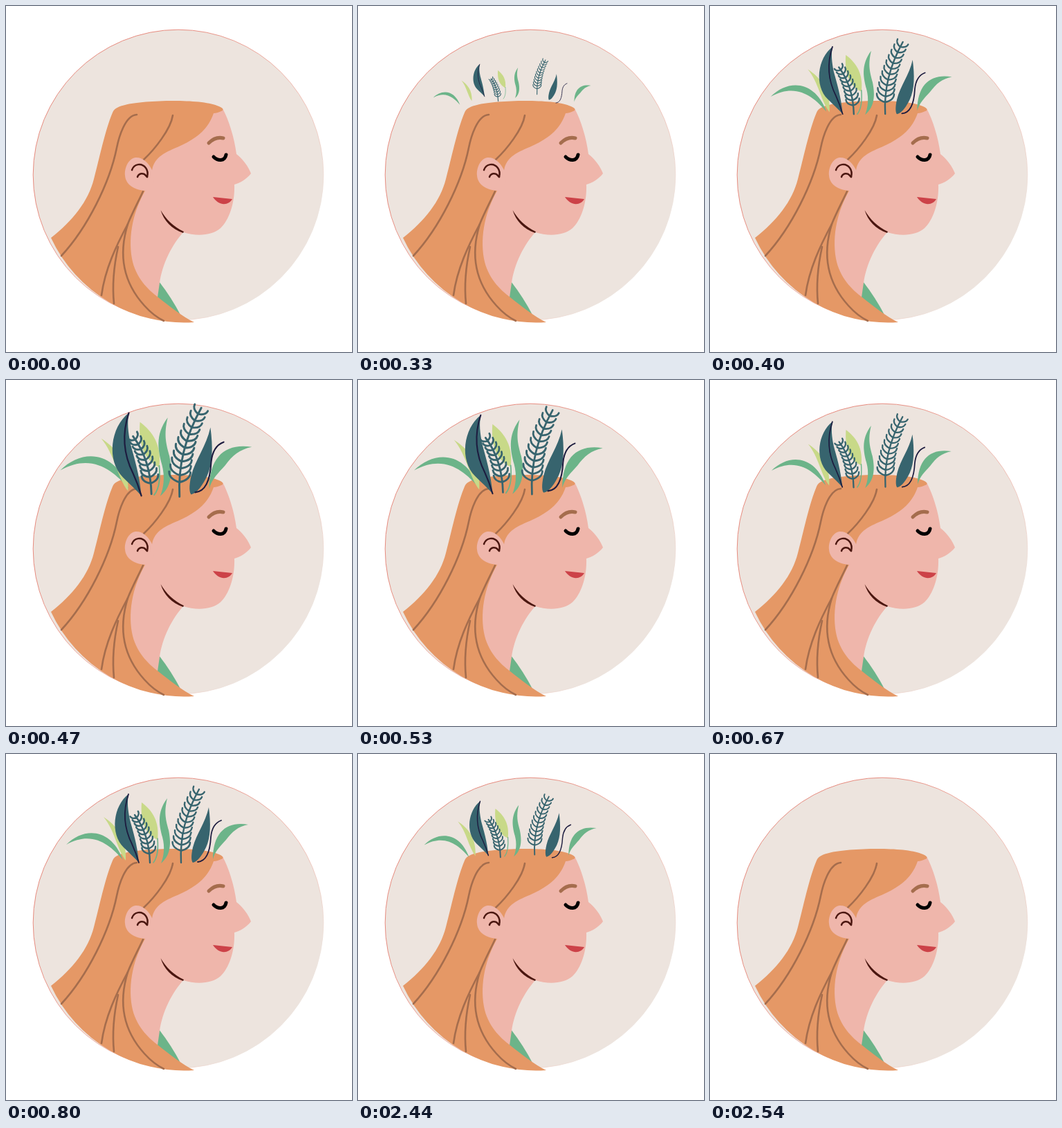
Write an HTML page that moves like this. It is 500 px wide and 500 px high and loops after 3500 ms.

```html
<!DOCTYPE html>
<html lang="en">
<head>
<meta charset="utf-8">
<title>Blooming mind</title>
<style>
html, body { margin: 0; width: 100%; height: 100%; overflow: hidden; background: #fff; }
svg { display: block; width: 100vw; height: 100vh; }
.line { fill: none; stroke-linecap: round; stroke-linejoin: round; }
.green { fill: #6cb489; }
.lime { fill: #c8d988; }
.teal { fill: #37646e; }
.navy { stroke: #1d1c3f; stroke-width: 1.8; }
.fern { stroke: #37646e; stroke-width: 2.4; }
.skin { fill: #efb6ab; }
.strand { stroke: #a56d4d; stroke-width: 2.6; }
</style>
</head>
<body>
<svg viewBox="0 0 500 500">
  <defs>
    <linearGradient id="rim" x2="1" y2=".8">
      <stop offset=".3" stop-color="#e58073"/>
      <stop offset=".65" stop-color="#f0b5aa"/>
      <stop offset=".9" stop-color="#ede4de"/>
    </linearGradient>
  </defs>
  <circle cx="249" cy="244" r="209.8" fill="#ede4de" stroke="url(#rim)" stroke-width=".9"/>

  <!-- face, neck and collar -->
  <path class="green" d="M221 398Q239 421 253 448L215 424Z"/>
  <path class="skin" d="M313 148C322 165 330 190 333 214C343 222 350 232 354 242C348 250 338 256 330 258C331 285 322 310 310 321C298 332 275 333 256 327C240 345 226 372 222 400L219 421L176 395V200L290 146Z"/>
  <path fill="#e59866" d="M65 335C96 311 119 282 127 250C135 220 143 180 154 154C157 147 164 145 172 143C200 136 280 134 305 144C315 147 315 151 311 152C307 154 303 155 300 155C293 176 278 190 252 202C232 211 214 217 211 238L201 267C185 295 176 330 182 365C187 392 205 410 220 421C235 433 255 449 272 457A212 212 0 0 1 65 335Z"/>
  <g class="line strand">
    <path d="M189 157C172 158 163 190 160 205C150 255 118 320 80 361"/>
    <path d="M241 158C238 178 215 207 199 222"/>
    <path d="M198 268C190 285 182 300 176 315C160 345 143 380 138 418"/>
    <path d="M162 348C156 375 153 400 156 430"/>
    <path d="M176 315C162 360 170 400 200 433C208 442 218 450 228 455"/>
  </g>
  <path class="skin" d="M212 239C206 225 196 218 187 219C176 221 171 235 172 245C173 258 185 266 202 267L214 255Z"/>
  <g class="line" stroke="#4b1710" stroke-width="2.5">
    <path d="M182 237C185 228 196 226 202 234C205 238 205 243 204 247"/>
    <path d="M190 247C192 241 199 241 202 245L204 247"/>
  </g>
  <path fill="#4b1710" d="M223.5 295C231 308 242 319 257 326L256 328C239 322 228 310 223.500 295Z"/>
  <path class="line" stroke="#a56d4d" stroke-width="5" d="M293 198C299 192 306 189 314 191"/>
  <path class="line" stroke="#000" stroke-width="5" d="M300 218C306 224 316 225 318 215"/>
  <path fill="#cc4248" d="M299 276L327 279C322 288 308 290 299 276Z"/>

  <g id="plants">
    <path class="green" d="M87 131C113 105 152 107 169 153C150 131 125 110 87 131Z"/>
    <path class="lime" d="M141 91C158 102 175 120 173 154C160 137 157 110 141 91Z"/>
    <g>
      <path class="teal" d="M177 58C155 75 150 115 170 135C178 143 186 150 192 157C190 132 183 110 179 95C176 80 175 70 177 58Z"/>
      <path class="line navy" d="M177 58C168 85 172 110 182 130Q188 143 192 157"/>
    </g>
    <g>
      <path class="lime" d="M196 70C212 82 222 98 219 124C200 115 194 95 196 70Z"/>
      <path class="line" stroke="#6cb489" stroke-width="1.5" d="M219 122C220 135 220 148 213 157"/>
    </g>
    <path class="line fern" id="small"/>
    <path class="green" d="M233 64C217 85 222 105 226 120C230 135 228 148 224 158C240 145 238 125 235 110C231 95 228 85 233 64Z"/>
    <path class="line fern" id="tall"/>
    <path class="teal" d="M293 77C288 100 275 115 270 135C267 148 268 155 270 157C278 155 284 145 289 135C296 120 296 100 293 77Z"/>
    <path class="line navy" d="M311 96C300 100 297 110 296 120C295 140 290 155 277 156"/>
    <path class="green" d="M350 102C320 97 299 112 299 152C302 140 310 133 318 124C327 112 335 105 350 102Z"/>
  </g>
</svg>
<script>
const LOOP = 3500;

// Quadratic stem with pairs of curled leaflets, shorter towards the tip.
function fern(id, [x0, y0], [cx, cy], [x1, y1], pairs, size) {
  let d = `M${x0} ${y0}Q${cx} ${cy} ${x1} ${y1}`;
  const at = (a, b, c, t) => (1 - t) ** 2 * a + 2 * t * (1 - t) * b + t * t * c;
  const slope = (a, b, c, t) => (1 - t) * (b - a) + t * (c - b);
  for (let i = 0; i < pairs; i++) {
    const t = 0.16 + 0.77 * i / (pairs - 1);
    const x = at(x0, cx, x1, t), y = at(y0, cy, y1, t);
    const dir = Math.atan2(slope(y0, cy, y1, t), slope(x0, cx, x1, t));
    const len = size * (1.05 - 0.4 * t);
    for (const side of [-1, 1]) {
      const point = (turn, r) =>
        `${(x + r * Math.cos(dir + side * turn)).toFixed(1)} ${(y + r * Math.sin(dir + side * turn)).toFixed(1)}`;
      d += `M${x.toFixed(1)} ${y.toFixed(1)}Q${point(1.3, len * 0.75)} ${point(0.8, len)}`;
    }
  }
  document.getElementById(id).setAttribute('d', d);
}
fern('small', [208, 157], [207, 116], [186, 88], 9, 14);
fern('tall', [253, 157], [250, 103], [279, 51], 11, 18);

// Each plant scales about its own centre.
const group = document.getElementById('plants');
const plants = [...group.children].map(el => {
  const box = el.getBBox();
  return { el, x: box.x + box.width / 2, y: box.y + box.height / 2 };
});

const ease = (a, b, p) => a + (b - a) * (1 - Math.cos(Math.PI * p)) / 2;

// Scale by 30 fps step: pop in with overshoot, hold, shrink away.
function scaleAt(n) {
  if (n < 8 || n >= 76) return 0;
  if (n < 14) return ease(0, 1.21, (n - 7) / 7);
  if (n < 20) return ease(1.21, 0.955, (n - 14) / 6);
  if (n < 24) return ease(0.955, 1, (n - 20) / 4);
  if (n < 73) return 1;
  return 1 - ((n - 72) / 4) ** 1.13;
}

function draw() {
  const t = performance.now() % LOOP;
  const s = scaleAt(Math.floor(Math.floor(t / 10) * 0.3 + 0.11));
  group.setAttribute('display', s ? 'inline' : 'none');
  if (s) {
    for (const { el, x, y } of plants) {
      el.setAttribute('transform', `translate(${x} ${y}) scale(${s}) translate(${-x} ${-y})`);
    }
  }
  requestAnimationFrame(draw);
}
draw();
</script>
</body>
</html>
```
